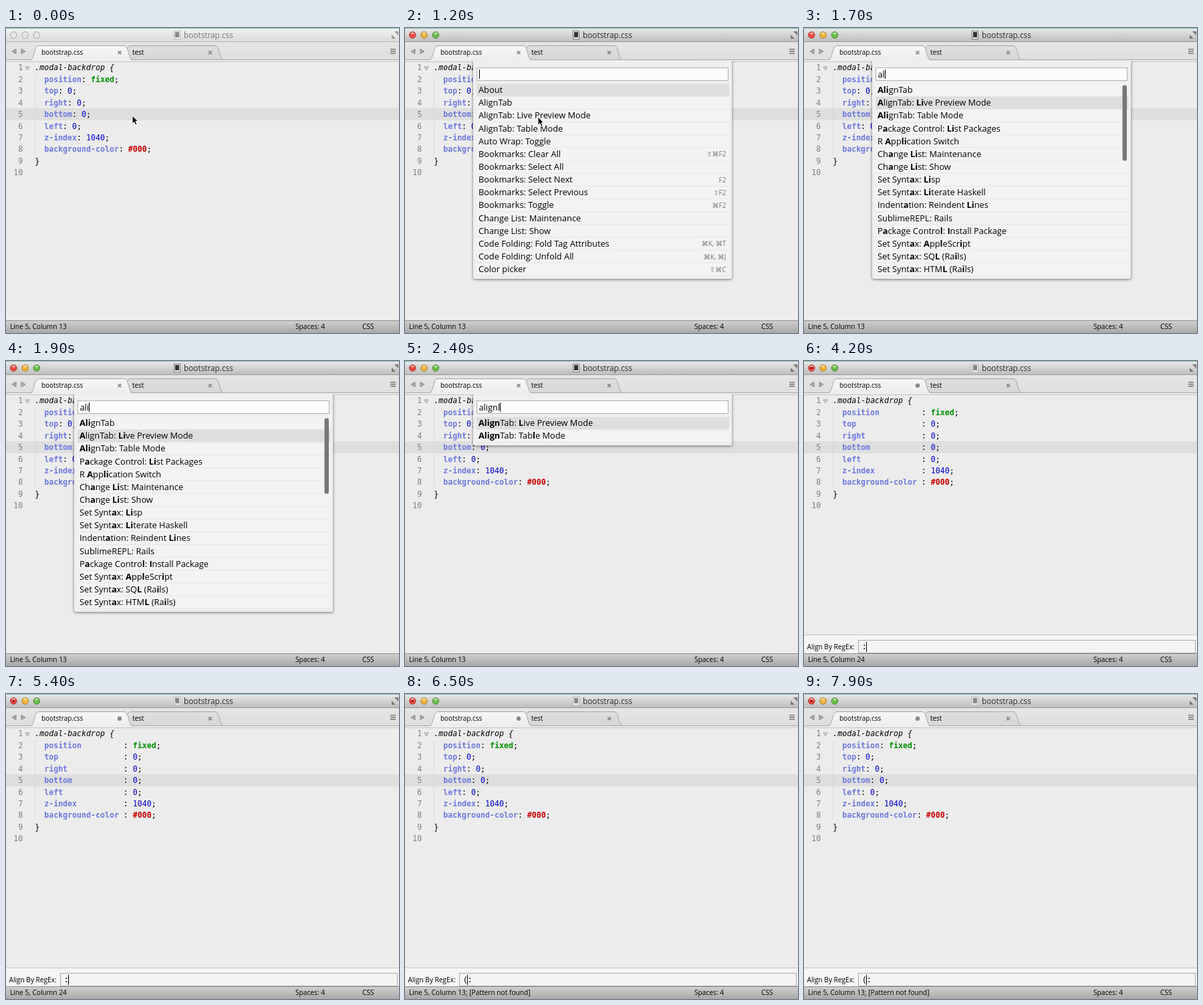
An HTML page with a canvas that plays this animation: 588x456 px, repeating every 8000 ms.

```html
<!DOCTYPE html>
<html lang="en">
<meta charset="utf-8">
<title>Align by pattern</title>
<style>
  html, body { margin: 0; width: 588px; height: 456px; overflow: hidden; background: #ececec; }
  canvas { display: block; }
</style>
<canvas id="stage" width="588" height="456"></canvas>
<script>
const g = document.getElementById('stage').getContext('2d');
const W = 588, LOOP = 8000;
const UI = '"Open Sans", "DejaVu Sans", sans-serif', MONO = '"DejaVu Sans Mono", monospace';
const CHAR = 6.98, LINE = 17.42, ROW = 19.14;

// Stars enclose the matched letters.
const ALL = ['About', 'AlignTab', 'AlignTab: Live Preview Mode', 'AlignTab: Table Mode',
  'Auto Wrap: Toggle', 'Bookmarks: Clear All|⇧⌘F2', 'Bookmarks: Select All',
  'Bookmarks: Select Next|F2', 'Bookmarks: Select Previous|⇧F2', 'Bookmarks: Toggle|⌘F2',
  'Change List: Maintenance', 'Change List: Show', 'Code Folding: Fold Tag Attributes|⌘K, ⌘T',
  'Code Folding: Unfold All|⌘K, ⌘J', 'Color picker|⇧⌘C'];
const FOUND = ['*Ali*gnTab', '*A*lignTab: *Li*ve Preview Mode', '*Ali*gnTab: Table Mode',
  'P*a*ckage Control: *Li*st Packages', 'R *A*pp*li*cation Switch', 'Ch*a*nge *Li*st: Maintenance',
  'Ch*a*nge *Li*st: Show', 'Set Synt*a*x: *Li*sp', 'Set Synt*a*x: *Li*terate Haskell',
  'Indent*a*tion: Reindent *Li*nes', 'SublimeREPL: Rails', 'P*a*ckage Contro*l*: *I*nstall Package',
  'Set Synt*a*x: *A*pp*l*eScr*i*pt', 'Set Synt*a*x: SQ*L* (Ra*i*ls)', 'Set Synt*a*x: HTM*L* (Ra*i*ls)'];

const RULES = [['position', 'fixed', '#009100', 'bold'], ['top', '0'], ['right', '0'], ['bottom', '0'],
  ['left', '0'], ['z-index', '1040'], ['background-color', '#000', '#c80000', 'bold']];

const QUERY = 'alignlive', KEYS = [1500, 1700, 1900, 2100, 2200, 2400, 2600, 2700, 2900];
const OPEN = 1200, PROMPT = 3600, ALIGN = 4000, LEFT = 6200, PAREN = 6500;
const BLINKS = [3300, 3600, 4500, 4900, 5200, 5400, 5900, 6200, 7100, 7200, 7500, 7900];
const MOUSE = [[100, 189, 131], [300, 204, 172], [450, 212, 188], [700, 199, 133]];

function text(s, x, y, size, color = '#000', font = UI, style = '', align = 'left') {
  g.font = `${style} ${size}px ${font}`;
  g.fillStyle = color;
  g.textAlign = align;
  g.fillText(s, x, y);
  return x + g.measureText(s).width;
}
function box(x, y, w, h, color) {
  g.fillStyle = color;
  g.fillRect(x, y, w, h);
}
function fade(y, h, top, bottom) {
  const f = g.createLinearGradient(0, y, 0, y + h);
  f.addColorStop(0, top);
  f.addColorStop(1, bottom);
  return f;
}
function path(points, fill, stroke, closed = true, width = 1) {
  g.beginPath();
  points.forEach(p => g.lineTo(...p));
  if (closed) g.closePath();
  if (fill) { g.fillStyle = fill; g.fill(); }
  if (stroke) { g.strokeStyle = stroke; g.lineWidth = width; g.stroke(); }
}
function disc(x, y, r, fill, stroke) {
  g.beginPath();
  g.arc(x, y, r, 0, 7);
  g.fillStyle = fill;
  g.fill();
  if (stroke) { g.strokeStyle = stroke; g.lineWidth = 1; g.stroke(); }
}
function rounded(x, y, w, h, r, fill) {
  g.beginPath();
  g.roundRect(x, y, w, h, r);
  g.fillStyle = fill;
  g.fill();
}
function frame(x, y, w, h, fill, stroke) {
  box(x, y, w, h, fill);
  g.strokeStyle = stroke;
  g.lineWidth = 1;
  g.strokeRect(x + .5, y + .5, w - 1, h - 1);
}
function cross(x, y) {
  path([[x - 2.5, y - 2.5], [x + 2.5, y + 2.5]], null, '#808080', false, 1.6);
  path([[x - 2.5, y + 2.5], [x + 2.5, y - 2.5]], null, '#808080', false, 1.6);
}

function titleBar(active, dirty) {
  box(0, 0, W, 21, active ? fade(0, 21, '#e9e9e9', '#bcbcbc') : fade(0, 21, '#f3f3f3', '#dadada'));
  box(0, 0, W, 1, '#7fbdb5');
  box(0, 20, W, 1, active ? '#9a9a9a' : '#b8b8b8');
  [['#ee4a43', '#a93831'], ['#f3b437', '#a87c27'], ['#6cbd4b', '#4a8535']].forEach(([fill, edge], i) => {
    const x = 11.3 + 17.3 * i;
    if (!active) return disc(x, 10.5, 4.8, '#e6e6e6', '#a0a0a0');
    disc(x, 10.5, 4.8, fill, edge);
    g.beginPath();
    g.ellipse(x, 8, 2.6, 1.5, 0, 0, 7);
    g.fillStyle = '#ffffff90';
    g.fill();
  });
  if (active && dirty) disc(11.3, 10.5, 1.7, '#7a1712');
  const clear = active && !dirty;
  frame(251, 4, 10, 13, '#f4f4f4', clear ? '#777' : '#b8b8b8');
  box(253, 6, 6, 8, clear ? '#333' : '#888');
  text('bootstrap.css', 266, 14.7, 11.8, active ? '#2c2c2c' : '#777');
  const c = active ? '#777' : '#999';
  path([[581, 5], [587, 5], [587, 11]], c);
  path([[577, 10], [577, 16], [583, 16]], c);
}

function tabShape(x, w, top, bottom) {
  g.beginPath();
  g.moveTo(x, 47.5);
  g.bezierCurveTo(x + 6, 46, x + 5, 26.5, x + 12, 26.5);
  g.lineTo(x + w - 12, 26.5);
  g.bezierCurveTo(x + w - 5, 26.5, x + w - 6, 46, x + w, 47.5);
  g.fillStyle = fade(26, 22, top, bottom);
  g.fill();
  g.strokeStyle = '#a4a4a4';
  g.lineWidth = 1;
  g.stroke();
}

function tabBar(dirty) {
  box(0, 21, W, 27, fade(21, 27, '#e5e5e5', '#dedede'));
  tabShape(174, 151, '#dfdfdf', '#d6d6d6');
  box(0, 47, W, 1, '#a8a8a8');
  box(0, 48, W, 2, '#ededed');
  tabShape(37, 152, '#f7f7f7', '#ededed');
  box(39, 47, 148, 2, '#ededed');
  box(0, 50, W, 1, '#c6c6c6');
  path([[9, 35], [15, 31.5], [15, 38.5]], '#aaa', '#888');
  path([[29, 35], [23, 31.5], [23, 38.5]], '#aaa', '#888');
  for (let i = 0; i < 3; i++) box(575, 31 + 3 * i, 8, 1.5, '#777');
  text('bootstrap.css', 53, 40, 9.95);
  text('test', 189, 40, 9.95);
  if (dirty) disc(170, 36.7, 3.2, '#888'); else cross(170, 36.7);
  cross(305.5, 36.7);
}

function code(s, x, line, color, style) {
  return text(s, x, 63.4 + LINE * line, 11.6, color, MONO, style);
}

function editor(aligned) {
  box(0, 51, W, 386, '#ececec');
  box(0, 120, W, 18, '#dedede');
  for (let i = 0; i < 10; i++)
    text(i + 1, 25.3, 63.4 + LINE * i, 11.6, '#808080', MONO, '', 'right');
  path([[29, 58], [35, 58], [32, 63]], '#ddd', '#999');
  for (let y = 70; y < 190; y += 2) box(43, y, 1, 1, '#cfcfcf');
  code('.modal-backdrop {', 43.3, 0, '#000', 'italic');
  RULES.forEach(([name, value, color = '#0000c8', style], i) => {
    const x = 57.2;
    code(name, x, i + 1, '#6d79de', 'bold');
    const colon = x + CHAR * (aligned ? 17 : name.length);
    code(':', colon, i + 1, '#000');
    code(';', code(value, colon + 2 * CHAR, i + 1, color, style), i + 1, '#000');
  });
  code('}', 43.3, 8, '#000');
}

function statusBar(message) {
  box(0, 437, W, 19, fade(437, 19, '#d0d0d0', '#a9a9a9'));
  box(0, 437, W, 1, '#8e8e8e');
  text(message, 6, 450, 10.2);
  text('Spaces: 4', 433, 450, 10.2);
  text('CSS', 533, 450, 10.2);
}

function results(n) {
  if (n < 1) return ALL;
  if (n < 4) return FOUND;
  const hit = `*${'Align'.slice(0, n)}*${'Align'.slice(n)}Tab`;
  if (n < 6) return [hit, hit + ': Live Preview Mode', hit + ': Table Mode'];
  if (n === 6) return [hit + ': *L*ive Preview Mode', hit + ': Tab*l*e Mode'];
  const rest = n - 5;
  return [`${hit}: *${'Live'.slice(0, rest)}*${'Live'.slice(rest)} Preview Mode`];
}

function palette(n, caret) {
  const rows = results(n), height = 38 + ROW * rows.length;
  const chosen = rows === FOUND ? 1 : 0;
  g.save();
  g.beginPath();
  g.rect(90, 50, 412, 400);
  g.clip();
  g.shadowColor = '#0008';
  g.shadowBlur = 4;
  g.shadowOffsetY = 1;
  rounded(102, 46, 387, height + 4, 3, '#efefef');
  g.restore();
  frame(107, 59, 377, 20, '#fcfcfc', '#b0b0b0');
  const end = text(QUERY.slice(0, n), 110.5, 73.7, 12.8);
  if (caret) box(Math.round(end), 62, 1, 14, '#000');
  rows.forEach((row, i) => {
    const y = 83.7 + ROW * i;
    box(107, y, 378, ROW, i === chosen ? '#dedede' : '#f3f3f3');
    box(107, y + ROW - 1, 378, 1, '#e4e4e4');
    const [label, keys] = row.split('|');
    let x = 110;
    label.split('*').forEach((part, k) => {
      x = text(part, x, y + 13.5, 12.8, '#000', UI, k % 2 ? 'bold' : '');
    });
    if (keys) text(keys, 480.5, y + 13, 10, '#777', UI, '', 'right');
  });
  if (rows === FOUND) rounded(476.5, 85.5, 6.5, 113, 3, '#777');
}

function prompt(value, column, caret) {
  box(0, 410, W, 27, '#f5f5f5');
  box(0, 409, W, 1, '#c4c4c4');
  text('Align By RegEx:', 4.5, 431, 10.1);
  frame(81, 417, 505, 20, '#f4f4f4', '#a8a8a8');
  text(value, 86.7, 431, 11.6, '#000', MONO);
  if (caret) box(Math.round(86.5 + CHAR * column), 420, 1, 15, '#000');
}

function mouse(t) {
  let i = 0;
  while (i < MOUSE.length - 2 && t > MOUSE[i + 1][0]) i++;
  const [a, b] = [MOUSE[i], MOUSE[i + 1]];
  const k = Math.min(1, Math.max(0, (t - a[0]) / (b[0] - a[0])));
  const x = a[1] + (b[1] - a[1]) * k, y = a[2] + (b[2] - a[2]) * k;
  path([[0, 0], [0, 12], [2.7, 9.5], [4.8, 14], [7, 13], [5, 8.7], [8.5, 8.5]]
    .map(([dx, dy]) => [x + dx, y + dy]), '#000', '#fff');
}

function draw(t) {
  const aligned = t >= ALIGN && t < PAREN, dirty = t >= ALIGN;
  const caret = BLINKS.filter(b => t >= b).length % 2 === 0;
  titleBar(t >= 100, dirty);
  editor(aligned);
  tabBar(dirty);
  statusBar('Line 5, Column ' + (aligned ? '24' : t < PAREN ? '13' : '13; [Pattern not found]'));
  if (t >= OPEN && t < PROMPT) palette(KEYS.filter(k => t >= k).length, caret);
  if (t >= PROMPT) {
    const value = t < ALIGN ? '' : t < PAREN ? ':' : '(:';
    const column = t < ALIGN || (t >= LEFT && t < PAREN) ? 0 : 1;
    prompt(value, column, caret);
  }
  if (t < KEYS[0]) mouse(t);
}

const start = performance.now();
(function tick() {
  draw((performance.now() - start) % LOOP);
  requestAnimationFrame(tick);
})();
</script>
</html>
```
